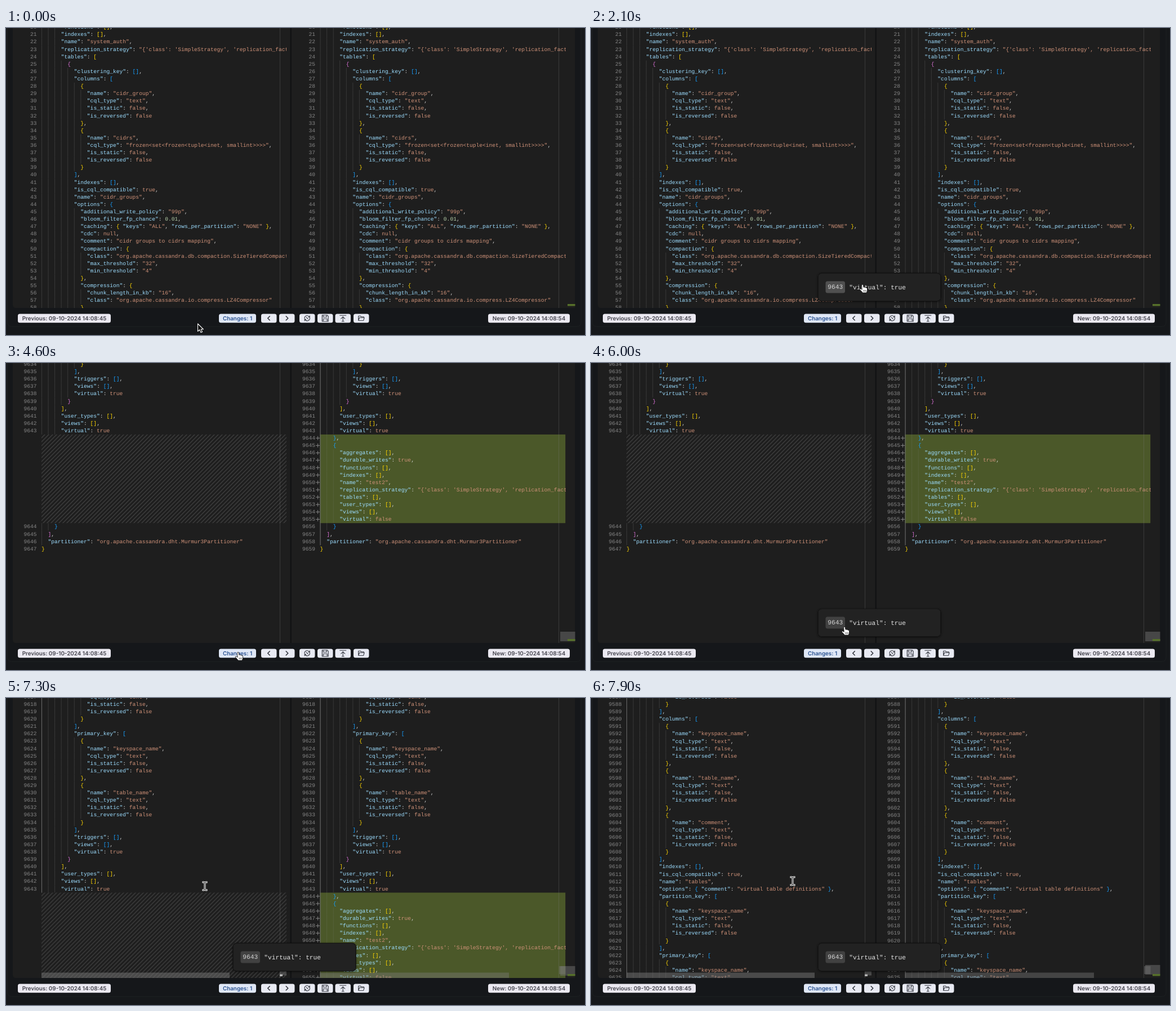
Write an HTML page that moves like this. It is 1028 px wide and 545 px high and loops after 8000 ms.

```html
<!DOCTYPE html>
<html lang="en">
<head>
<meta charset="utf-8">
<title>Metadata diff</title>
<style>
  html, body { margin: 0; width: 100%; height: 100%; overflow: hidden; background: #16181b; }
  svg { display: block; width: 100vw; height: 100vh; text-rendering: geometricPrecision; }
  .code text { font: 9.625px "Liberation Mono", monospace; white-space: pre; }
  .ui text { font: 600 9.85px Inter, sans-serif; text-anchor: middle; }
  #popup text { font: 11.2px "Liberation Mono", monospace; white-space: pre; }
  .icon { fill: none; stroke: #33363f; stroke-width: 1.1; stroke-linecap: round; stroke-linejoin: round; }
</style>
</head>
<body>
<svg id="stage" viewBox="0 0 1028 545" preserveAspectRatio="none">
  <defs>
    <clipPath id="clipL"><rect x="12" width="486" height="497"/></clipPath>
    <clipPath id="clipR"><rect x="507" width="487" height="497"/></clipPath>
    <pattern id="hatch" width="7" height="7" patternUnits="userSpaceOnUse">
      <path d="M-2 1.100L1.100 -2M-1 7.100L7.100 -1M5 8.100L8.100 5" stroke="#414141" stroke-width="1.240"/>
    </pattern>
    <filter id="shadow" x="-10%" y="-30%" width="120%" height="160%">
      <feDropShadow dx="0" dy="1" stdDeviation="2" flood-opacity=".45"/>
    </filter>
  </defs>

  <rect width="1028" height="545" fill="#16181b"/>
  <path d="M2.500 -5V522q0 8 8 8H1013q8 0 8 -8V-5z" fill="#15171a" stroke="#1d2022"/>
  <path d="M12 0V491q0 6 6 6H1010V0z" fill="#1e1e1e"/>
  <rect x="504.500" width="2.500" height="497" fill="#121314"/>

  <g class="code" clip-path="url(#clipL)"><g id="topL"></g><g id="tailL"></g></g>
  <g class="code" clip-path="url(#clipR)"><g id="topR"></g><g id="tailR"></g></g>
  <path d="M486.500 0V497M981.500 0V497" stroke="#7f7f7f" stroke-opacity=".3"/>

  <g id="barsL" fill="#797979" fill-opacity=".48">
    <rect x="63" y="487.500" width="334" height="9.500"/>
    <rect x="486" y="476" width="12" height="16.500"/>
  </g>
  <rect id="caretMark" x="486" y="490.500" width="5" height="3.500" fill="#b4b4b4"/>
  <g id="barsR" fill="#797979" fill-opacity=".42">
    <rect x="558" y="487.500" width="335" height="9.500"/>
    <rect x="982" y="476" width="11.500" height="14"/>
  </g>
  <rect id="overview" x="984" width="26.500" height="17" fill="#797979" fill-opacity=".45"/>
  <rect x="997" y="490" width="13.500" height="3.500" fill="#56702a"/>

  <g class="ui" id="bar"></g>

  <g id="popup">
    <rect x="403" y="435.500" width="218" height="49" rx="6" fill="#242424" stroke="#141414" stroke-width="1.400" filter="url(#shadow)"/>
    <rect id="badge" x="416.500" y="449.500" width="34.500" height="21" rx="3.500"/>
    <text x="420.300" y="463.300" fill="#d5d5d5">9643</text>
    <text x="458.300" y="463.900" fill="#e4e4e4">"virtual": true</text>
  </g>

  <g id="arrow">
    <path d="M0 0V13.500L3.200 10.700L5.500 15.600L8 14.500L5.800 9.800H10z" fill="#111" stroke="#fff" stroke-width="1.100" stroke-linejoin="round"/>
  </g>
  <g id="hand">
    <path d="M-1.400 1.200Q0 -.6 1.400 1.200L1.900 5.200Q3.300 4.400 4.200 5.500Q5.700 4.900 6.400 6.200Q8.300 5.800 8.500 7.600V11Q8.200 13 7.200 15H.3Q-1.200 12.500 -4.700 9.600Q-5.200 7.700 -3.200 7.900L-.8 9.300z" fill="#fff" stroke="#161616" stroke-width=".9" stroke-linejoin="round"/>
    <path d="M2 10V13M4 10V13M6 10V13" stroke="#222" stroke-width=".7"/>
  </g>
  <g id="beam" fill="none" stroke-linecap="square">
    <path d="M-3 -7H-1.500L0 -6L1.500 -7H3M0 -6V6M-3 7H-1.500L0 6L1.500 7H3" stroke="#fff" stroke-width="3"/>
    <path d="M-3 -7H-1.500L0 -6L1.500 -7H3M0 -6V6M-3 7H-1.500L0 6L1.500 7H3" stroke="#111" stroke-width="1"/>
  </g>
</svg>

<script>
const $ = id => document.getElementById(id);
const LINE = 13.11, CH = 5.775, LEFT = 63, RIGHT = 557.6;
const TAIL_TOP = 113.8 - 56 * LINE;

function add(parent, tag, attrs, text) {
  const el = document.createElementNS("http://www.w3.org/2000/svg", tag);
  for (const k in attrs) el.setAttribute(k, attrs[k]);
  if (text !== undefined) el.textContent = text;
  parent.appendChild(el);
  return el;
}

// Code content
const split = s => s.replace(/^\n|\n$/g, "").split("\n");
const column = (name, type = "text", end = ",") => split(`
            {
              "name": "${name}",
              "cql_type": "${type}",
              "is_static": false,
              "is_reversed": false
            }${end}`);
const strategy = `      "replication_strategy": "{'class': 'SimpleStrategy', 'replication_factor': '1'}",`;

const topLines = [
  ...split(`
      "functions": [],
      "indexes": [],
      "name": "system_auth",
${strategy}
      "tables": [
        {
          "clustering_key": [],
          "columns": [`),
  ...column("cidr_group"),
  ...column("cidrs", "frozen<set<frozen<tuple<inet, smallint>>>>", ""),
  ...split(`
          ],
          "indexes": [],
          "is_cql_compatible": true,
          "name": "cidr_groups",
          "options": {
            "additional_write_policy": "99p",
            "bloom_filter_fp_chance": 0.01,
            "caching": { "keys": "ALL", "rows_per_partition": "NONE" },
            "cdc": null,
            "comment": "cidr groups to cidrs mapping",
            "compaction": {
              "class": "org.apache.cassandra.db.compaction.SizeTieredCompactionStrategy",
              "max_threshold": "32",
              "min_threshold": "4"
            },
            "compression": {
              "chunk_length_in_kb": "16",
              "class": "org.apache.cassandra.io.compress.LZ4Compressor"
            },`)
];

const tailLines = [
  ...split(`
              "is_reversed": false
            }
          ],
          "columns": [`),
  ...column("keyspace_name"), ...column("table_name"), ...column("comment", "text", ""),
  ...split(`
          ],
          "indexes": [],
          "is_cql_compatible": true,
          "name": "tables",
          "options": { "comment": "virtual table definitions" },
          "partition_key": [`),
  ...column("keyspace_name", "text", ""),
  ...split(`
          ],
          "primary_key": [`),
  ...column("keyspace_name"), ...column("table_name", "text", ""),
  ...split(`
          ],
          "triggers": [],
          "views": [],
          "virtual": true
        }
      ],
      "user_types": [],
      "views": [],
      "virtual": true`)
];
const addedLines = split(`
    },
    {
      "aggregates": [],
      "durable_writes": true,
      "functions": [],
      "indexes": [],
      "name": "test2",
${strategy}
      "tables": [],
      "user_types": [],
      "views": [],
      "virtual": false`);
const endLines = split(`
    }
  ],
  "partitioner": "org.apache.cassandra.dht.Murmur3Partitioner"
}`);

// Code drawing
const BRACKETS = ["#ffd700", "#da70d6", "#179fff"];
const TOKEN = /("[^"]*")(?=:)|("[^"]*"|true|false|null)|([\[\]{}])|(\d[\d.]*)|([^"\[\]{}\w]+)/g;

function drawLine(g, base, row, num, line, isNew) {
  const indent = line.search(/\S/), y = row * LINE, baseline = y + 9.2;
  let guides = "";
  for (let c = 0; c < indent; c += 2) guides += `M${base + c * CH + .5} ${y}v${LINE}`;
  if (guides) add(g, "path", { d: guides, stroke: isNew ? "#5a6540" : "#404040", "stroke-width": .8 });
  const label = add(g, "text", { x: base - 8.5, y: baseline, "text-anchor": "end", fill: "#858585" }, num);
  if (isNew) add(g, "path", { d: `M${base - 7.5} ${y + 6.4}h7m-3.500 -3.500v7`, stroke: "#8f8f8f", "stroke-width": .9 });
  const text = add(g, "text", { x: base + indent * CH, y: baseline });
  for (const [s, key, value, bracket, number] of line.trim().matchAll(TOKEN)) {
    const fill = key ? "#9cdcfe" : value ? "#ce9178" : bracket ? BRACKETS[indent / 2 % 3] : number ? "#b5cea8" : "#d4d4d4";
    add(text, "tspan", { fill }, s);
  }
  return label;
}
function drawLines(g, base, row, num, lines, isNew) {
  return lines.map((l, i) => drawLine(g, base, row + i, num + i, l, isNew));
}

drawLines($("topL"), LEFT, 0, 20, topLines);
drawLines($("topR"), RIGHT, 0, 20, topLines);
for (const id of ["topL", "topR"]) $(id).setAttribute("transform", `translate(0 ${5.2 - LINE})`);

const tailL = $("tailL"), tailR = $("tailR");
const block = { y: 57 * LINE, height: 12 * LINE };
$("hatch").setAttribute("x", LEFT);
$("hatch").setAttribute("y", block.y);
add(tailL, "rect", { x: LEFT, width: 435, fill: "url(#hatch)", ...block });
add(tailR, "rect", { x: RIGHT, width: 435.6, fill: "#4b5829", ...block });
drawLines(tailL, LEFT, 0, 9587, tailLines);
drawLines(tailR, RIGHT, 0, 9587, tailLines);
drawLines(tailR, RIGHT, 57, 9644, addedLines, true);
const lastLabel = drawLines(tailL, LEFT, 69, 9644, endLines)[3];
drawLines(tailR, RIGHT, 69, 9656, endLines);

const activeGuide = (g, base, d) => add(g, "path", { d, stroke: "#707070", "stroke-width": .9 });
activeGuide(tailR, RIGHT, `M${RIGHT + .5} 0V${72 * LINE}`);
const caret = add(tailL, "g", {});
activeGuide(caret, LEFT, `M${LEFT + .5} 0V${57 * LINE}M${LEFT + .5} ${69 * LINE}V${72 * LINE}`);
add(caret, "path", { d: `M${LEFT} ${72 * LINE}H498M${LEFT} ${73 * LINE}H498`, stroke: "#303030" });
add(caret, "rect", { x: LEFT + .4, y: 72 * LINE + .5, width: 5.4, height: 12, fill: "none", stroke: "#888", "stroke-width": .8 });
add(caret, "rect", { x: LEFT + CH, y: 72 * LINE, width: 1.4, height: LINE, fill: "#d8d8d8" });

// Bottom bar
function pill(x, w, fill, label, ink) {
  const r = add($("bar"), "rect", { x, y: 507.4, width: w, height: 15.8, rx: 3.5, fill });
  if (label) add($("bar"), "text", { x: x + w / 2, y: 518.8, fill: ink }, label);
  return r;
}
pill(21, 165, "#ebe9f1", "Previous: 09-10-2024 14:08:45", "#43424c");
pill(856, 145, "#ebe9f1", "New: 09-10-2024 14:08:54", "#43424c");
const changes = pill(378, 66, "#dfe7f6", "Changes: 1", "#2a5291");
const icons = [
  [453, "M1.500 -3.500L-2 0L1.500 3.500"],
  [485, "M-1.500 -3.500L2 0L-1.500 3.500"],
  [521, "M-4.500 1A4.500 4.500 0 0 1 3 -3.300L4.500 -2M4.500 -4.500V-2H2M4.500 -1A4.500 4.500 0 0 1 -3 3.300L-4.500 2M-4.500 4.500V2H-2M-1.500 -1.500L1.500 1.500"],
  [553, "M-5.500 -5.500H3.500L5.500 -3.500V5.500H-5.500zM-3.500 -5.500V-2H2.500V-5.500M-3.500 5.500V1H3.500V5.500"],
  [584.5, "M-5.500 -5H5.500M0 5.500V-2M-3.500 1L0 -2.500L3.500 1M-2 5.500H2"],
  [617, "M-5 4V-4H-1.500L0 -2.500H4.500V-1M-5 4L-3.300 -1H5.500L4 4z"]
];
for (const [x, d] of icons) {
  pill(x, 27.5, "#e8eaf3");
  const path = add($("bar"), "path", { d, class: "icon", transform: `translate(${x + 13.75} 515.2)` });
  if (x < 500) path.style.strokeWidth = 1.6;
}

// Pointer stops: time, x, y, kind when it changes
const stops = [
  [0, 340.5, 525, "arrow"], [100, 353, 522], [200, 376, 516], [300, 395, 512, "hand"],
  [1600, 404, 502], [1700, 438, 479], [1800, 472, 458], [1900, 486, 450],
  [2100, 482, 455], [2200, 431, 478], [2300, 445, 492], [2500, 460, 478], [2600, 473, 464], [2800, 477, 459],
  [4000, 470, 467], [4100, 456, 485], [4200, 436, 502], [4300, 420, 511], [4400, 412, 513],
  [5700, 420, 505], [5800, 436, 486], [5900, 446, 473], [6000, 450, 468], [6100, 448, 464],
  [6200, 440, 450], [6300, 420, 418, "beam"], [6400, 386, 370], [6500, 363, 344], [6600, 355, 336],
  [6700, 353, 334], [7800, 356, 329], [7900, 358, 325]
];
// Wheel notches: time, total
const notches = [[0, 0], [7000, 3], [7100, 4], [7200, 4.5], [7300, 5], [7400, 7], [7500, 9], [7600, 11], [7800, 13], [7900, 14]];
const NOTCH = 43.72;

const clamp = v => Math.max(0, Math.min(1, v));
const show = (el, on) => { el.style.display = on ? "" : "none"; };
const latest = (list, t) => list.filter(s => s[0] <= t).pop();

function popupState(t) {
  const start = t < 5000 ? 700 : 5000, age = t - start;
  const fade = t < 5000 ? 1 - clamp((t - 4000) / 500) : 1;
  return { alpha: clamp((age + 50) / 350) * fade, dy: 10 * (1 - clamp(age / 1500)) ** 2, on: age >= 0 };
}

function render(t) {
  const jumped = t >= 3600, clicked = t >= 6800;
  const shift = latest(notches, t)[1] * NOTCH;
  for (const id of ["topL", "topR"]) show($(id), !jumped);
  for (const g of [tailL, tailR]) {
    show(g, jumped);
    g.setAttribute("transform", `translate(0 ${TAIL_TOP + shift})`);
  }
  show(caret, clicked);
  show($("caretMark"), clicked);
  lastLabel.setAttribute("fill", clicked ? "#c6c6c6" : "#858585");

  const flash = !jumped ? 0 : t < 3700 ? .12 : 1 - clamp((t - 3900) / 700);
  $("barsL").setAttribute("opacity", Math.max(flash, clamp((t - 6200) / 200)));
  $("barsR").setAttribute("opacity", Math.max(flash, clamp((t - 7000) / 100)));
  show($("overview"), jumped);
  $("overview").setAttribute("y", 477 - shift * .005);

  const pop = popupState(t);
  show($("popup"), pop.on && pop.alpha > 0);
  $("popup").setAttribute("opacity", pop.alpha);
  $("popup").setAttribute("transform", `translate(0 ${pop.dy})`);
  $("badge").setAttribute("fill", t >= 1800 && t < 4000 ? "#505050" : "#414141");
  const pressed = (t >= 700 && t < 1000) || (t >= 5000 && t < 5300);
  changes.setAttribute("fill", pressed ? "#ccd8ee" : "#dfe7f6");

  const [, x, y] = latest(stops, t);
  const kind = latest(stops.filter(s => s[3]), t)[3];
  for (const id of ["arrow", "hand", "beam"]) show($(id), id === kind);
  $(kind).setAttribute("transform", `translate(${x} ${y})`);
}

const begin = performance.now();
function tick(now) {
  const t = Math.max(0, now - begin) % 8000;
  render(Math.floor(t / 100) * 100);
  requestAnimationFrame(tick);
}
render(0);
requestAnimationFrame(tick);
</script>
</body>
</html>
```
